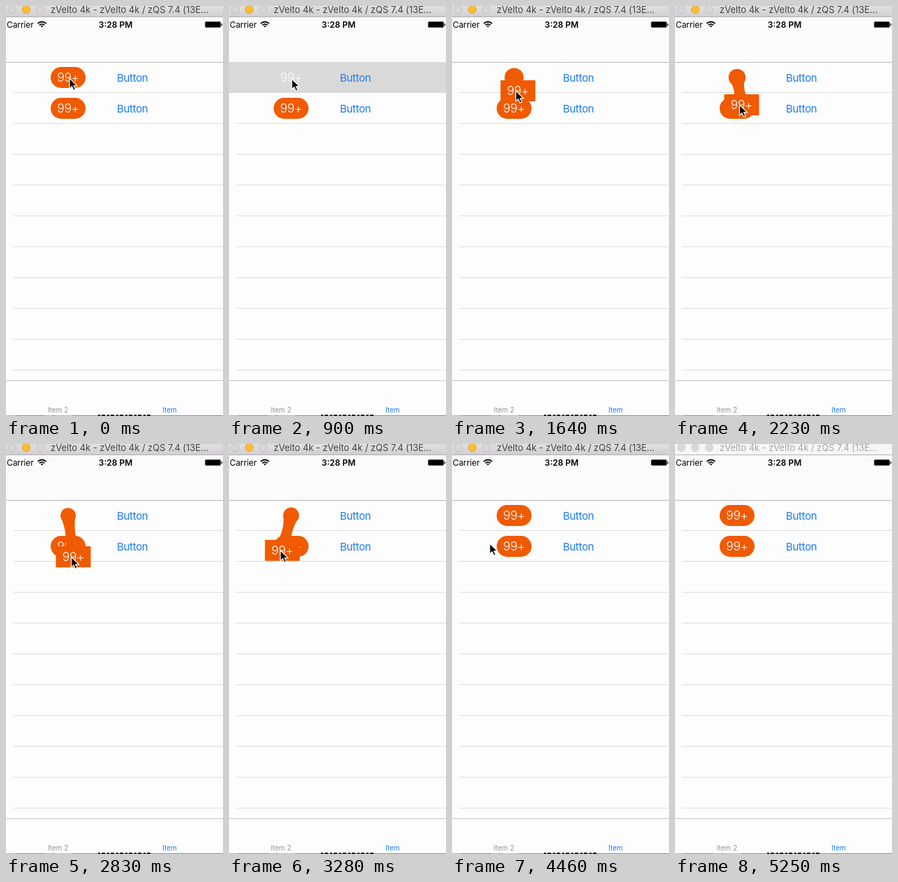
An HTML page that plays this animation: 311x585 px, repeating every 5.27 s.

```html
<!DOCTYPE html>
<html lang="en">
<head>
<meta charset="utf-8">
<style>
  html, body { margin: 0; width: 100%; height: 100%; overflow: hidden; background: #fdfdfd; }
  svg { display: block; width: 311px; height: 585px; font-family: Inter, "Open Sans", sans-serif; }
  .badge { fill: #f05a00; }
  .count { fill: #fff; font-size: 17.5px; font-weight: 300; text-anchor: middle; letter-spacing: -.4px; }
  .button { fill: #1a7af0; font-size: 15px; letter-spacing: -.3px; }
  .tab { font-size: 10px; }
</style>
</head>
<body>
<svg viewBox="0 0 311 585">
  <defs>
    <linearGradient id="chrome" x2="0" y2="1">
      <stop stop-color="#e2e0e2"/><stop offset="1" stop-color="#d0ced0"/>
    </linearGradient>
  </defs>
  <rect width="311" height="585" fill="#fdfdfd"/>
  <rect y="16" width="311" height="64" fill="#fbfbfb"/>
  <g id="titleBar">
    <rect id="barFill" width="311" height="15"/>
    <rect y="15" width="311" height="1" fill="#b4b2b4"/>
    <g id="lights"></g>
    <text id="title" x="64" y="10" font-size="13" letter-spacing="-.05">zVelto 4k - zVelto 4k / zQS 7.4 (13E...</text>
  </g>

  <g font-size="12">
    <text x="1" y="31" letter-spacing="-.1">Carrier</text>
    <text x="157" y="31" text-anchor="middle" font-weight="600">3:28 PM</text>
  </g>
  <g fill="none" stroke="#000" stroke-width="1.7">
    <path d="M45.5 25q6-5 12 0M47.7 27.4q3.8-3 7.6 0"/>
    <path d="M49.5 28.6q2-1.4 4 0l-2 2z" fill="#000" stroke="none"/>
  </g>
  <rect x="285.5" y="22.5" width="22" height="8" rx="1.5" fill="#000" stroke="#555"/>
  <rect x="308.5" y="25" width="1.2" height="3.5"/>

  <g id="lines"></g>
  <rect id="highlight" y="80" width="311" height="44" fill="#d9d9d9"/>
  <g id="cells"></g>

  <g id="drag">
    <circle id="anchor" class="badge" cx="89" cy="102"/>
    <path id="neck" class="badge"/>
    <g id="tag">
      <rect class="badge" x="-25" y="-15" width="50" height="30"/>
      <text class="count" y="6">99+</text>
    </g>
  </g>

  <rect y="534" width="311" height="1" fill="#c4c4c4"/>
  <text class="tab" x="74.5" y="580" text-anchor="middle" fill="#929292">Item 2</text>
  <text class="tab" x="234.5" y="580" text-anchor="middle" fill="#1a7af0">Item</text>
  <path d="M0 584.5H311" stroke="#8c8c8c"/>
  <path d="M0 584.5H13M56 584.5H66M70 584.5H95" stroke="#d8c020"/>
  <path d="M132 584H210" stroke="#222" stroke-width="2" stroke-dasharray="3 2 5 3"/>

  <path id="cursor" d="M0 0V15L3.5 11.8 6 17.2 8.6 16 6.2 10.8H11Z" stroke="#fff" stroke-width="1.2"/>
</svg>
<script>
const $ = id => document.getElementById(id);
const LOOP = 5270, TICK = 148.6, HOME = { x: 89, y: 102 };

// Pointer path: [tick, x, y]
const path = [
  [0, 91, 103], [2, 91, 103], [3, 90, 104], [7, 90, 104], [11, 91.5, 121],
  [13, 92, 131], [19, 93.5, 161], [20, 93.5, 162], [21, 91, 159], [25, 21, 130],
  [26, 21, 130], [27, 22, 131], [28, 22, 130], [29, 22, 130], [30, 54, 142], [34, 230, 520]
];

for (let y = 123; y < 534; y += 44)
  $('lines').innerHTML += `<rect x="10" y="${y}" width="301" height="1" fill="#dcdcde"/>`;
$('lines').innerHTML += '<rect y="80" width="311" height="1" fill="#b8b8b8"/>';

$('cells').innerHTML = [102, 146].map((y, i) => `
  <g id="badge${i}">
    <rect id="pill${i}" class="badge" x="64" y="${y - 15}" width="50" height="30" rx="15"/>
    <text class="count" x="89" y="${y + 6}">99+</text>
  </g>
  <text class="button" x="159" y="${y + 5.5}">Button</text>`).join('');

$('lights').innerHTML = [9, 29, 49].map(x =>
  `<circle cx="${x}" cy="5" r="5.5"/>`).join('');
const lights = [...$('lights').children];

function pointerAt(tick) {
  const i = Math.max(1, path.findIndex(key => key[0] >= tick));
  const [t0, x0, y0] = path[i - 1], [t1, x1, y1] = path[i];
  const k = (tick - t0) / (t1 - t0);
  return { x: x0 + (x1 - x0) * k, y: y0 + (y1 - y0) * k };
}

function show(id, visible) {
  $(id).style.display = visible ? '' : 'none';
}

function drawNeck(to) {
  const dx = to.x - HOME.x, dy = to.y - HOME.y, d = Math.hypot(dx, dy) || 1;
  const r = 15 - d * .07;
  // Point at a fraction along the band, offset sideways
  const at = (k, side) => `${HOME.x + dx * k - dy / d * side} ${HOME.y + dy * k + dx / d * side}`;
  $('anchor').setAttribute('r', r);
  $('neck').setAttribute('d',
    `M${at(0, r)}Q${at(.5, 2)} ${at(1, 14)}L${at(1, -14)}Q${at(.5, -2)} ${at(0, -r)}Z`);
}

function draw(t) {
  const tick = Math.min(34, Math.floor((t + 5) / TICK));
  const active = t < 5250, pressed = tick === 6, dragging = tick > 6 && tick < 30;
  const p = pointerAt(tick), tag = { x: p.x + 3, y: p.y };

  $('barFill').setAttribute('fill', active ? 'url(#chrome)' : '#f6f6f6');
  $('title').setAttribute('fill', active ? '#444' : '#a4a4a4');
  lights.forEach((light, i) => {
    light.setAttribute('fill', !active ? '#d9d9d9' : i === 1 ? '#fdbd2e' : '#d8d6d8');
    light.setAttribute('stroke', !active ? '#d0d0d0' : i === 1 ? '#e0a028' : '#bebcbe');
  });

  show('highlight', pressed);
  show('pill0', !pressed);
  show('badge0', !dragging);
  show('drag', dragging);
  if (dragging) {
    drawNeck(tag);
    $('tag').setAttribute('transform', `translate(${tag.x} ${tag.y})`);
  }
  show('cursor', active);
  $('cursor').setAttribute('transform', `translate(${p.x} ${p.y})`);
}

function frame() {
  draw(performance.now() % LOOP);
  requestAnimationFrame(frame);
}
frame();
</script>
</body>
</html>
```
